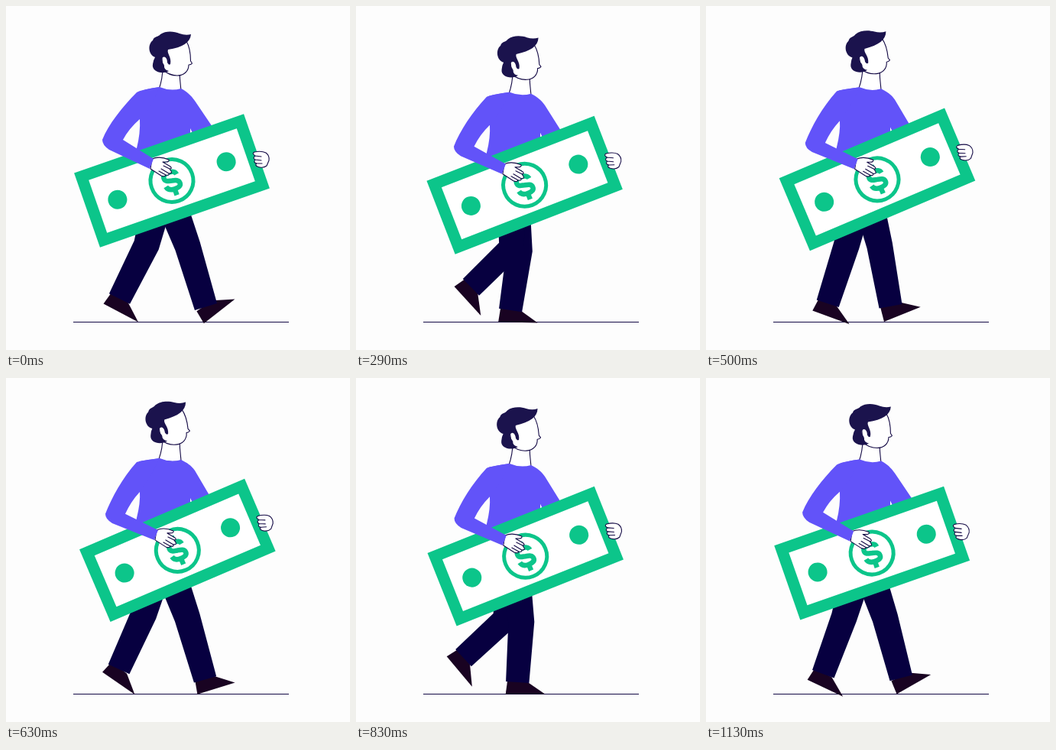
Write an HTML page that moves like this. It is 450x450 px and loops after 1180 ms.

```html
<!DOCTYPE html>
<html lang="en">
<head>
<meta charset="utf-8">
<title>Walking with a banknote</title>
<style>
  html, body { margin: 0; width: 100%; height: 100%; overflow: hidden; background: #fdfdfd; }
  svg { display: block; width: 100vw; height: 100vh; }
  .line { fill: #fff; stroke: #140a45; stroke-width: 1.1; stroke-linecap: round; stroke-linejoin: round; }
  .shirt { fill: #6253f9; }
  .hair { fill: #1b134d; }
  .shoe { fill: #190322; }
  .green { fill: #0cc58a; }
  .ring { fill: #fff; stroke: #0cc58a; }
  .trousers { fill: #070040; }
</style>
</head>
<body>
<svg viewBox="0 0 450 450">
  <path d="M88 413.5H370" stroke="#140a45" stroke-width="1.2"/>
  <g class="leg"><path class="shoe"/><polygon class="trousers"/></g>
  <g class="leg"><path class="shoe"/><polygon class="trousers"/></g>

  <g id="body">
    <path class="line" d="M205 80Q205 95 200 109Q215 115 229 111Q227 95 227 80"/>
    <g id="head">
      <path class="line" d="M236 46C240 53 241.500 63 241.500 72L243.500 75Q242 77 239 77C239 85 233 91 224 91Q213 91 205 83L203 55Z"/>
      <path class="hair" d="M242 37C241 48 231 54 212 57C210 62 217 67 215 76Q213 78 211 74C211 67 206 64 204 69C203 74 208 76 207 80Q208 84 213 85C205 90 190 86 192 76Q193 70 195 67C186 64 185 50 192 45C194 39 199 41 202 37C209 32 220 33 227 36Q235 39 242 37Z"/>
    </g>
    <path id="torso" class="shirt"/>
    <g id="bill">
      <g transform="translate(217 228.5) rotate(-19.2)">
        <rect class="green" x="-117.5" y="-51.5" width="235" height="103"/>
        <rect fill="#fff" x="-102.5" y="-36.5" width="205" height="73"/>
        <circle class="green" cx="-75.3" r="12.5"/>
        <circle class="green" cx="75.3" r="12.5"/>
        <circle class="ring" r="28" stroke-width="5"/>
        <path fill="none" stroke="#0cc58a" stroke-width="6.5"
          d="M8.5 -6C8 -10 4 -11.500 0 -11.500C-5 -11.500 -9 -10 -9 -6C-9 -1 -4 -1 0 0C5 1 9 2 9 6.500C9 10 5 11.500 0 11.500C-5 11.500 -9 10 -10 5M0 -20V-10M0 10V20"/>
      </g>
      <path class="line" d="M325 191Q334 189 340 192Q345 196 344 202L341 209Q336 213 329 210Q325 208 328 206Q323 205 326 201Q322 199 326 196Q321 193 325 191ZM326 196L334 197M326 201L334 202M328 206L335 206"/>
    </g>
    <path id="hand" class="line" d="M191 200C198 197 206 198 213 201Q214 204 209 204L205 204L215 210Q218 213 214 213L216 216Q218 219 213 219Q214 222 209 221Q208 224 203 222L189 213ZM214 213L206 209M213 219L203 213M209 221L200 216"/>
    <path id="arm" class="shirt"/>
  </g>
</svg>
<script>
const LOOP = 1180, FRAME = 1000 / 24, THIGH = 88, SHIN = 79;
const $ = id => document.getElementById(id);
const legs = [...document.querySelectorAll('.leg')];

// One stride of a foot: time, ankle x, ankle y, sole angle
const stride = [
  [0, 261.5, 393.5, -38], [40, 260, 394.5, -15], [100, 249, 396, 0],
  [170, 235, 396, 0], [240, 212, 398, 0], [380, 187, 397, 5],
  [410, 177, 394, 6], [540, 152.5, 387, 26], [590, 148.5, 383, 28],
  [630, 147.5, 380.5, 35], [760, 144, 370, 33], [830, 140, 366, 50],
  [970, 177, 376, 32], [1000, 199, 391, 4], [1130, 257, 392.5, -31]
];

function key(i) {
  const n = stride.length, turn = Math.floor(i / n);
  const [t, ...pose] = stride[i - turn * n];
  return [t + turn * LOOP, ...pose];
}

// Smooth periodic curve through the stride keys
function footAt(t) {
  let i = stride.length - 1;
  while (stride[i][0] > t) i--;
  const [a, b, c, d] = [-1, 0, 1, 2].map(j => key(i + j));
  const h = c[0] - b[0], u = (t - b[0]) / h;
  return [1, 2, 3].map(j => {
    const m = (c[j] - a[j]) / (c[0] - a[0]) * h;
    const n = (d[j] - b[j]) / (d[0] - b[0]) * h;
    return b[j] + u * (m + u * (3 * (c[j] - b[j]) - 2 * m - n + u * (2 * (b[j] - c[j]) + m + n)));
  });
}

// Outline of a leg that narrows from hip to ankle
function outline(hip, knee, ankle) {
  const slope = (a, b) => Math.atan2(b[1] - a[1], b[0] - a[0]);
  const thigh = slope(hip, knee), shin = slope(knee, ankle);
  const side = s => [[hip, thigh, 21], [knee, (thigh + shin) / 2, 17], [ankle, shin, 15.2]]
    .map(([p, dir, w]) => [p[0] + s * w * Math.sin(dir), p[1] - s * w * Math.cos(dir)]);
  return [...side(1), ...side(-1).reverse()].join(' ');
}

function drawLeg(leg, t, bob) {
  const [x, y, angle] = footAt(t % LOOP);
  const hx = 205, hy = 228 + bob;
  const dist = Math.hypot(x - hx, y - hy);
  const ux = (x - hx) / dist, uy = (y - hy) / dist;
  const along = dist < THIGH + SHIN
    ? (THIGH ** 2 - SHIN ** 2 + dist ** 2) / (2 * dist)
    : dist * THIGH / (THIGH + SHIN);
  const bend = Math.max(3, 0.7 * Math.sqrt(Math.max(0, THIGH ** 2 - along ** 2)));
  const knee = [hx + ux * along + uy * bend, hy + uy * along - ux * bend];
  const [shoe, trousers] = leg.children;
  trousers.setAttribute('points', outline([hx, hy], knee, [x, y]));
  shoe.setAttribute('d', 'M-13 -3L-15.5 15.5H36L12 -1Z');
  shoe.setAttribute('transform', `translate(${x} ${y}) rotate(${angle})`);
}

function draw(t) {
  const a = 2 * Math.PI * t / LOOP;
  const k = (1 - Math.cos(a)) / 2;
  const bob = 2.02 + 1.68 * Math.cos(a) - 3.7 * Math.cos(2 * a);
  legs.forEach((leg, i) => drawLeg(leg, t + i * LOOP / 2, bob));

  $('body').setAttribute('transform', `translate(0 ${bob})`);
  $('head').setAttribute('transform', `rotate(${-5.8 * k} 215 105)`);
  $('bill').setAttribute('transform', `translate(${7.4 * k} 0) rotate(${-4 * k} 217 228.5)`);
  $('hand').setAttribute('transform', `translate(${6 * k} ${2 * k})`);
  const collar = 106 + 2 * k;
  $('torso').setAttribute('d',
    `M201 ${collar}Q215 ${collar + 6} 229 ${collar + 2}C237 ${collar + 6} 242 117 247 124L${270 - 3 * k} 158L280 180L246 170L241 160V215H165L171 186Q176 166 175 ${148 + 4 * k}L174 112Q185 ${collar + 2} 201 ${collar}Z`);
  $('arm').setAttribute('d',
    `M201 ${collar}Q178 ${collar + 3} 171 113C152 ${132 + 2 * k} ${134 + 4 * k} ${155 + 5 * k} ${126 + 4 * k} ${175 + 6 * k}
     Q${126 + 4 * k} ${182 + 6 * k} ${135 + 4 * k} ${188 + 5 * k}L${188 + 6 * k} ${213 + 2 * k}L${193 + 6 * k} ${200 + 2 * k}
     L${153 + 3 * k} ${175 + 6 * k}Q${161 + 2 * k} ${160 + 5 * k} 175 ${148 + 4 * k}L190 130Z`);
}

function tick() {
  const t = performance.now() % LOOP;
  draw(Math.min(27, Math.floor((t + 5) / FRAME)) * FRAME);
  requestAnimationFrame(tick);
}
tick();
</script>
</body>
</html>
```
